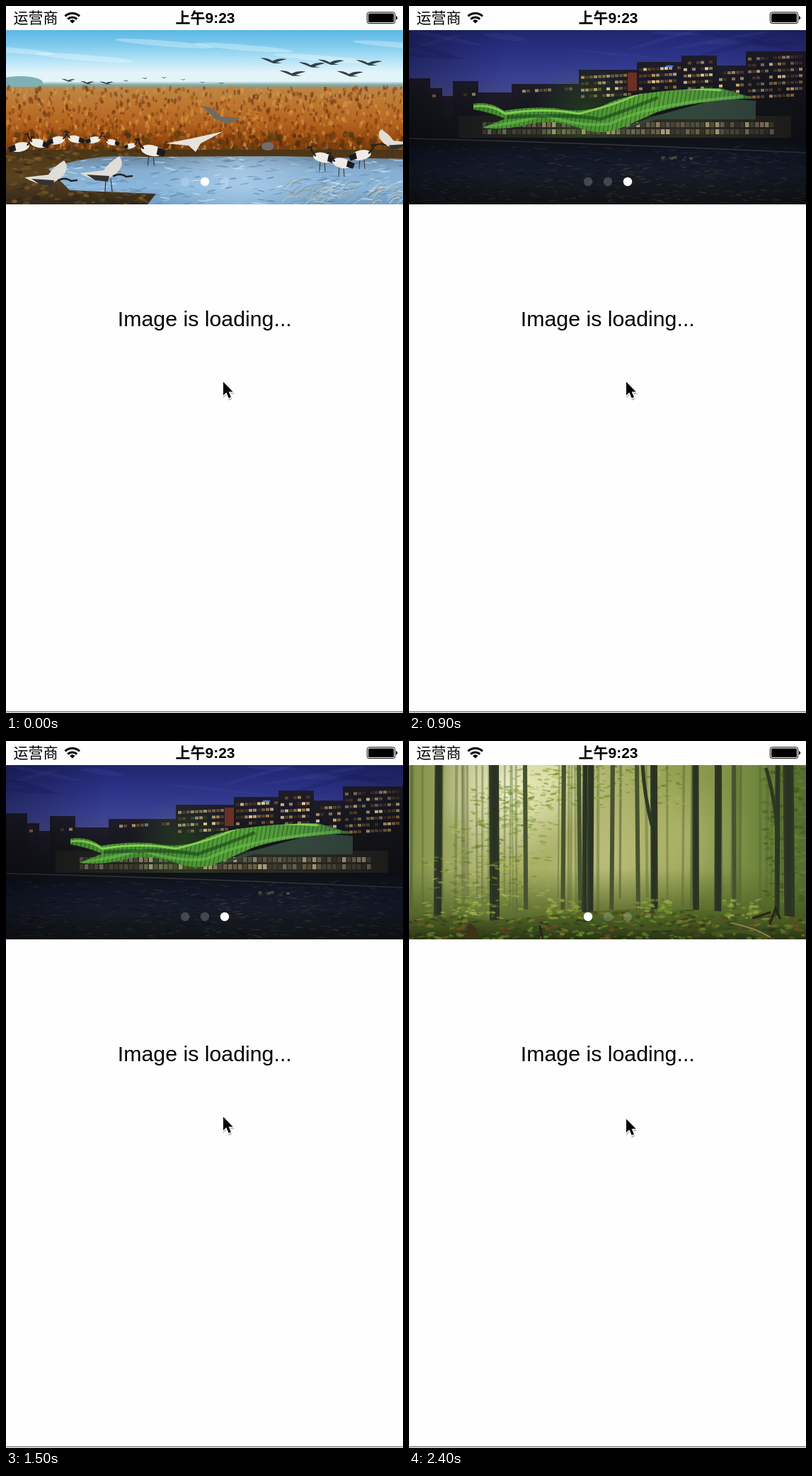
These frames come from a looping animation (561 px wide and 998 px high, 2700 ms). An HTML page with a canvas:

```html
<!DOCTYPE html>
<html lang="zh">
<head>
<meta charset="utf-8">
<title>Image carousel</title>
<style>
html, body { margin: 0; width: 100%; height: 100%; overflow: hidden; background: #fff; }
#stage { position: absolute; left: 0; top: 0; width: 561px; height: 998px; overflow: hidden; background: #fefefe; }
#banner { position: absolute; left: 0; top: 34px; width: 561px; height: 246px; overflow: hidden; }
#track { display: flex; width: 1683px; animation: slide 2.7s step-end infinite; }
canvas { display: block; flex: none; }
svg { position: absolute; left: 0; top: 0; }
text { font-family: "Liberation Sans", "Noto Sans CJK SC", "Noto Sans CJK", sans-serif; }
#dot { animation: page 2.7s step-end infinite; }
#pointer { animation: nudge 2.7s step-end infinite; }
@keyframes slide {
  0% { transform: translateX(0); }
  22.22% { transform: translateX(-336px); }
  33.33% { transform: translateX(-561px); }
  66.66%, 100% { transform: translateX(-1122px); }
}
@keyframes page {
  0% { transform: translateX(28px); }
  22.22% { transform: translateX(56px); }
  66.66%, 100% { transform: translateX(0); }
}
@keyframes nudge {
  0% { transform: translateY(0); }
  77.77%, 100% { transform: translateY(3px); }
}
</style>
</head>
<body>
<div id="stage">
  <div id="banner"><div id="track">
    <canvas id="marsh" width="561" height="246"></canvas>
    <canvas id="night" width="561" height="246"></canvas>
    <canvas id="forest" width="561" height="246"></canvas>
  </div></div>
  <svg width="561" height="998" viewBox="0 0 561 998">
    <text x="10.5" y="24.3" font-size="21" font-weight="300">运营商</text>
    <g fill="none" stroke="#000" stroke-width="3">
      <path d="M83.5 14.4a14.5 14.5 0 0 1 20.4 0"/>
      <path d="M87.2 18.6a9.2 9.2 0 0 1 13 0"/>
    </g>
    <path d="M93.7 24.6l-3.7-3.7a5.2 5.2 0 0 1 7.4 0z"/>
    <text x="239.5" y="24.3" font-size="21" font-weight="700">上午9:23</text>
    <rect x="510.3" y="8.8" width="39.4" height="15.8" rx="3" fill="none" stroke="#000" stroke-width="1"/>
    <rect x="512" y="10.5" width="36" height="12.4" rx="1.5"/>
    <path d="M551 14q2.2.5 2.2 2.8t-2.2 2.8z"/>
    <g fill="#fff">
      <g fill-opacity=".2">
        <circle cx="253" cy="248" r="6.2"/><circle cx="281" cy="248" r="6.2"/><circle cx="309" cy="248" r="6.2"/>
      </g>
      <circle id="dot" cx="253" cy="248" r="6.2"/>
    </g>
    <text x="280.8" y="452" font-size="30.3" text-anchor="middle">Image is loading...</text>
    <g id="pointer">
      <path d="M307 531v19l4.4-4 3.4 8 3.2-1.4-3.4-7.6h6z" opacity=".25" transform="translate(.5 2)" stroke="#000" stroke-width="1.5"/>
      <path d="M307 530.5v19l4.4-4 3.4 8 3.2-1.4-3.4-7.6h6z" stroke="#fff" stroke-width="2.4" paint-order="stroke"/>
    </g>
    <rect y="995.6" width="561" height="1.4" fill="#77747a"/>
  </svg>
</div>
<script>
let c, seed = 7;
const W = 561;
const rnd = (a = 1, b = 0) => {
  seed = (seed * 16807) % 2147483647;
  return b + (a - b) * seed / 2147483647;
};
const pick = list => list[Math.floor(rnd(list.length))];
const times = (n, draw) => { for (let i = 0; i < n; i++) draw(i); };

// Scenes use stage coordinates; the banner starts at y = 34.
function scene(id) {
  c = document.getElementById(id).getContext('2d');
  c.translate(0, -34);
  c.lineCap = 'round';
}
function ramp(x0, y0, x1, y1, ...cols) {
  const g = c.createLinearGradient(x0, y0, x1, y1);
  cols.forEach((s, i) => g.addColorStop(i / (cols.length - 1), s));
  return g;
}
const down = (y0, y1, ...cols) => ramp(0, y0, 0, y1, ...cols);
const across = (...cols) => ramp(0, 0, W, 0, ...cols);
function box(x, y, w, h, fill) { c.fillStyle = fill; c.fillRect(x, y, w, h); }
function shape(d, fill) { c.fillStyle = fill; c.fill(new Path2D(d)); }
function line(d, col, w = 1) { c.strokeStyle = col; c.lineWidth = w; c.stroke(new Path2D(d)); }
function oval(x, y, rx, ry, fill, turn = 0) {
  c.fillStyle = fill;
  c.beginPath();
  c.ellipse(x, y, rx, ry, turn, 0, 7);
  c.fill();
}
function glow(x, y, r, rgb, a) {
  const g = c.createRadialGradient(x, y, 0, x, y, r);
  g.addColorStop(0, `rgba(${rgb},${a})`);
  g.addColorStop(1, `rgba(${rgb},0)`);
  box(x - r, y - r, 2 * r, 2 * r, g);
}
function faded(alpha, draw) {
  c.globalAlpha = alpha;
  draw();
  c.globalAlpha = 1;
}
// Scatter small flecks of size rx, ry over an area.
const flecks = (n, x0, y0, x1, y1, rx, ry, cols, alpha) => faded(alpha, () => times(n, () =>
  oval(rnd(x1, x0), rnd(y1, y0), rx * rnd(1.3, .5), ry * rnd(1.3, .5), pick(cols), rnd(.3, -.3))));
function clipped(d, draw) {
  c.save();
  c.clip(new Path2D(d));
  draw();
  c.restore();
}
function placed(x, y, s, dir, draw) {
  c.save();
  c.translate(x, y);
  c.scale(s * dir, s);
  draw();
  c.restore();
}

const crane = (x, y, s, dir = 1) => placed(x, y, s, dir, () => {
  line('M-2 5l-1 14M4 5l1 14', '#3a302a', 1);
  oval(0, 0, 14, 7, '#efece6', -.2);
  shape('M-8 -4l-10 5 3 7 9-3z', '#1b1a1c');
  line('M11 -3q6 -5 6 -12l4 1', '#26221f', 2.4);
});
const landing = (x, y, s, dir = 1) => placed(x, y, s, dir, () => {
  line('M2 12l-2 18M9 12l1 18', '#3a302a', 1.2);
  shape('M-4 6Q-20 -8 -10 -20Q4 -12 12 0L46 4Q28 15 10 14z', '#dfddd6');
  shape('M4 8l32-2-12 8-18 2z', '#333331');
  line('M-2 8q-10 -5 -18 1l-8 -1', '#26221f', 2.6);
});
const flier = (x, y, s) => placed(x, y, s, 1, () =>
  shape('M-22 -5Q-8 -5 -2 0Q10 -6 22 -3Q12 -1 5 2L14 4 0 4z', '#33424a'));

scene('marsh');
box(0, 34, W, 84, down(34, 114, '#5bb8e5', '#7cc9ec', '#ade0f5', '#e2f5fb', '#e6f3f3'));
times(6, i => {
  const x = i * 112;
  oval(x, 62 + 12 * Math.sin(i * 2), 70, 4, 'rgba(255,255,255,.3)', .08);
});
box(0, 107, W, 9, down(107, 116, '#cfe6ea', '#7fa8a8', '#a3946a'));
oval(20, 108, 32, 9, '#7fb0b6');
box(0, 114, W, 106, down(114, 215, '#b98a4c', '#bd7630', '#b3641f', '#96490f', '#54300f'));
times(5, i => {
  const y = 115 + i * 18;
  flecks(260, 0, y, W, y + 18, 2, 3.5, ['#d9994a', '#c8752a', '#8a4210', '#6a3410'], .55);
});
flecks(150, 0, 180, W, 206, 4, 5, ['#3c240c', '#6d3a10', '#4a3812'], .55);
box(0, 203, W, 77, down(203, 280, '#4c3515', '#5a4220', '#33281a'));
flecks(200, 0, 200, 200, 280, 5, 2, ['#7a5a28', '#2b2214', '#94642a', '#4b4720'], .5);
clipped('M60 230Q120 208 190 213L390 212 561 216V280H200L212 265 90 260z', () => {
  box(0, 205, W, 75, down(208, 280, '#5f7b95', '#86aed0', '#8ab6da', '#6f9cc4'));
  glow(330, 245, 120, '196,224,246', .5);
  flecks(330, 60, 212, W, 280, 7, .9, ['#e3f2fc', '#4a739a', '#a5cbe8', '#5b87b0'], .5);
});
faded(.55, () => times(90, () => {
  const x = rnd(W, 390), y = rnd(285, 255);
  line(`M${x} ${y}q6 -10 ${rnd(28, 14)} -${rnd(14, 5)}`, pick(['#d8d8d0', '#a9b3ad', '#7b8985']), 1.2);
}));
times(9, i => flier(88 + i * 27, 105 + 4 * Math.sin(i), i < 3 ? .45 : .18));
times(6, i => flier(378 + i * 27, 86 + 10 * Math.sin(i * 2.2 - 1), .85));
times(7, i => crane(20 + i * 26, 199 - 11 * Math.sin(i / 2), .95 - i * .07, i % 2 ? -1 : 1));
times(3, i => crane(448 + i * 27, 214 + 8 * Math.sin(i * 1.8), 1, i < 2 ? -1 : 1));
crane(206, 204, 1.1, -1);
landing(72, 238, 1, -1);
landing(150, 232, 1, -1);
landing(538, 190, .8);
shape('M226 194L262 187 307 177 275 194 268 206 258 197z', '#e6e3dd');
shape('M276 141Q294 142 303 156L333 158 312 167 296 160z', '#716a62');
oval(370, 198, 9, 6, '#736c67');

scene('night');
box(0, 34, W, 170, down(34, 130, '#20266e', '#2b3184', '#383f92', '#474a88'));
flecks(14, 0, 36, W, 75, 60, 3, ['#1b2064', '#3d4494'], .3);
// Roof steps: left edge and height of each block.
const roofs = [[0, 102], [30, 116], [47, 127], [62, 106], [98, 122], [145, 110], [240, 90], [322, 79], [385, 70], [435, 84], [476, 64]];
const warm = ['#e2bd7c', '#a87b42', '#f0d9a2', '#6d4f2c', '#4a3a28'];
roofs.forEach(([x, y], i) => {
  const end = i + 1 < roofs.length ? roofs[i + 1][0] : W;
  box(x, y, end - x, 205 - y, down(y, 200, '#1e1c29', '#15161b', '#0e1013'));
  const lit = x < 140 ? .12 : x < 240 ? .35 : .8;
  for (let v = y + 9; v < 128; v += 9)
    for (let u = x + 3; u < end - 5; u += 6)
      if (rnd() < lit) faded(rnd(.95, .4), () => box(u, v - (u - x) * .05, 5, 4, pick(warm)));
});
box(309, 94, 13, 26, '#6b3026');
oval(368, 85, 6, 1.5, '#4678e0');
box(70, 155, 470, 32, across('#17191c', '#24251f', '#2b2b24', '#211f1d'));
for (let x = 104; x < 515; x += 7)
  times(2, i => faded(rnd(.75, .2), () => box(x, 164 + i * 10, 5.5, 7, pick(['#d8c495', '#93805a', '#594f3d', '#7f8468']))));
shape('M290 178L345 156 440 130 490 134V160H350z', '#33463c');
glow(250, 152, 75, '80,160,45', .25);
const ribbon = 'M91 138Q115 134 134 148Q165 142 205 144Q250 153 280 138Q320 118 440 116L488 130Q400 134 350 150L300 172Q270 184 240 172Q200 158 165 168Q130 176 104 172L136 159Q115 150 91 146z';
shape(ribbon, across('#3f8a2c', '#4a9a33', '#478f32', '#56a338', '#4c8f3c', '#31523a'));
clipped(ribbon, () => {
  for (let x = 88; x < 490; x += 6) line(`M${x} 180l12 -70`, 'rgba(18,50,20,.4)', 1.6);
  line('M91 142Q115 138 136 152Q190 143 240 152Q290 140 320 126T440 119', '#86cf52', 3);
  line('M105 171Q150 166 190 154Q245 172 285 166Q340 138 470 128', 'rgba(110,190,80,.6)', 4);
  line('M140 157Q230 152 270 160Q310 146 350 130', 'rgba(24,66,28,.6)', 5);
});
box(0, 186, W, 94, down(188, 280, '#0f1116', '#121726', '#161b28', '#14181d', '#101214'));
line('M0 187Q220 192 561 207', '#34353a', 1.4);
flecks(420, 0, 198, W, 280, 6, .7, ['#2b3448', '#090c14', '#2f3636', '#1f273a'], .5);
flecks(90, 200, 214, W, 276, 5, .7, ['#4f5540', '#3a4732', '#5f5238'], .4);
flecks(14, 354, 213, 402, 219, 3, 1.5, ['#75664a', '#3c3a36'], .6);
box(0, 34, W, 246, across('rgba(0,0,8,.3)', 'rgba(0,0,8,0)', 'rgba(0,0,8,0)', 'rgba(0,0,8,0)', 'rgba(0,0,8,.2)'));

scene('forest');
box(0, 34, W, 246, across('#7d8f45', '#b0b475', '#a5ad62', '#abb06a', '#96a152', '#7a8f44', '#526c2d'));
glow(140, 70, 105, '255,255,225', .8);
glow(205, 50, 80, '252,252,205', .5);
glow(290, 160, 140, '214,212,150', .35);
glow(395, 135, 90, '210,211,145', .3);
box(0, 180, W, 100, down(180, 280, 'rgba(80,100,35,0)', 'rgba(72,92,30,.6)', '#34491a'));
function trunk(x, w, end, col) {
  const lean = Math.sin(x) * 2, r = w / 2;
  shape(`M${x - r} 34h${w}L${x + lean + r} ${end}h${-w}z`, col);
}
const leaves = ['#8da636', '#a3b548', '#6d8c2c', '#b4c25c', '#4f701f'];
times(45, () => trunk(rnd(W), rnd(4.5, 2), rnd(245, 220), 'rgba(84,98,50,.4)'));
times(9, () => {
  const x = rnd(W), y = rnd(110, 40);
  flecks(60, x - 45, y - 30, x + 45, y + 30, 4, 1.3, leaves, .45);
});
flecks(240, 60, 110, 200, 235, 5, 1.4, leaves, .4);
flecks(200, 500, 34, W, 230, 5, 2, ['#4c6a22', '#66862c', '#39521c'], .5);
[164, 219, 240, 288, 322, 459].forEach(x => trunk(x, 6, 238, '#47532f'));
// Front trunks: position and width.
[[42, 11], [120, 14], [249, 7], [257, 9], [346, 10], [405, 9], [437, 10], [521, 7], [536, 15]].forEach(([x, w]) =>
  trunk(x, w, x < 130 ? 280 : 242 + x / 40, ramp(x - w, 0, x + w, 0, '#3a452c', '#283122', '#343f28')));
line('M330 34Q333 80 343 118M505 40Q520 90 521 150', '#2d3825', 5);
flecks(110, 20, 160, 160, 250, 5, 1.3, leaves, .45);
const ground = 'M0 250Q60 240 110 254Q200 246 290 238Q400 234 561 250V280H0z';
shape(ground, down(238, 280, '#566c28', '#435520', '#263414'));
clipped(ground, () =>
  flecks(520, 0, 238, W, 282, 5, 1.8, ['#2e4318', '#69852a', '#7c5529', '#222f13', '#7b9a33', '#5a4220'], .55));
times(4, i => flecks(45, 70 + i * 125, 224, 120 + i * 125, 250, 4, 1.8, leaves, .5));
line('M280 256Q330 270 378 263M430 272Q470 262 505 278', '#43541f', 5);
line('M455 257Q490 264 510 277', '#94804a', 2);
line('M486 250l24 -8M510 258l8 -22 6 14M185 262l4 16', '#28221a', 3);
shape('M82 260l5 -3 8 8 8 15H80z', '#3c3319');
</script>
</body>
</html>
```
